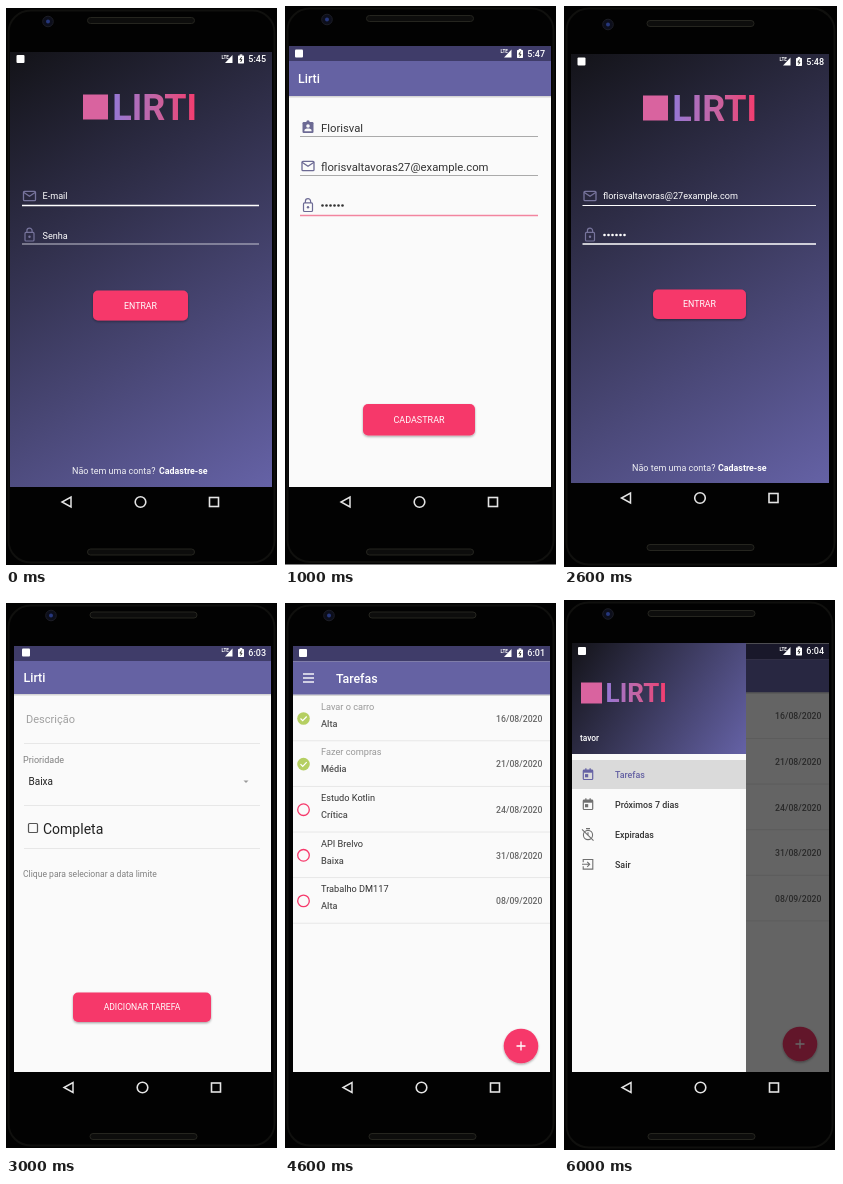
Write an HTML page that moves like this. It is 273x561 px and loops after 7 s.

```html
<!DOCTYPE html>
<html lang="pt">
<head>
<meta charset="utf-8">
<style>
html, body { margin: 0; width: 100%; height: 100%; overflow: hidden; background: #fff; }
svg { display: block; width: 273px; height: 561px; font-family: Roboto, "Noto Sans", sans-serif; }
</style>
</head>
<body>
<svg id="stage" viewBox="0 0 273 561">
  <defs>
    <linearGradient id="night" gradientUnits="userSpaceOnUse" x1="6" y1="46" x2="266" y2="480">
      <stop offset="0" stop-color="#131318"/><stop offset="1" stop-color="#6562a6"/>
    </linearGradient>
    <linearGradient id="header" gradientUnits="userSpaceOnUse" x1="8" y1="48" x2="182" y2="159">
      <stop offset="0" stop-color="#131318"/><stop offset="1" stop-color="#6562a6"/>
    </linearGradient>
    <linearGradient id="brand">
      <stop offset="0" stop-color="#9478d6"/><stop offset=".55" stop-color="#c9629f"/><stop offset="1" stop-color="#f53b6d"/>
    </linearGradient>
    <filter id="shadow" x="-20%" y="-40%" width="140%" height="190%">
      <feDropShadow dx="0" dy="1.2" stdDeviation="1.2" flood-opacity=".35"/>
    </filter>
  </defs>
</svg>
<script>
const PINK = '#f6396b', PURPLE = '#6562a3', PAPER = '#fafafa', DIVIDER = '#e7e7e7';
const APP = 'Lirti';

const rect = (x, y, w, h, fill, rx = 0, more = '') =>
  `<rect x="${x}" y="${y}" width="${w}" height="${h}" fill="${fill}" rx="${rx}" ${more}/>`;
const circle = (x, y, r, fill, more = '') => `<circle cx="${x}" cy="${y}" r="${r}" fill="${fill}" ${more}/>`;
const path = (d, stroke, w = 1, fill = 'none') =>
  `<path d="${d}" fill="${fill}" stroke="${stroke}" stroke-width="${w}"/>`;
const text = (x, y, s, size, fill, weight = 400, anchor = 'start') =>
  `<text x="${x}" y="${y}" font-size="${size}" fill="${fill}" font-weight="${weight}" text-anchor="${anchor}">${s}</text>`;
const rule = (x1, x2, y, color, w = 1) => path(`M${x1} ${y}H${x2}`, color, w);
const at = (x, y, body) => `<g transform="translate(${x} ${y})">${body}</g>`;

// Icons, centred on 0,0
const icons = {
  mail: c => rect(-6, -4.7, 12, 9.4, 'none', 1, `stroke="${c}" stroke-width="1.3"`) + path('M-6 -3.8L0 .3L6 -3.8', c, 1.3),
  lock: c => rect(-4.5, -2.6, 9, 8.6, 'none', 1, `stroke="${c}" stroke-width="1.2"`) +
    path('M-2.6 -2.6V-4.2A2.6 2.6 0 0 1 2.6 -4.2V-2.6', c, 1.2) + circle(0, 1.7, 1.2, c),
  badge: c => rect(-5.5, -5, 11, 11, c, 1.2) + circle(0, -5, 1.7, c) + circle(0, -1, 1.8, PAPER) +
    path('M-3.6 4.2V3.4C-3.6 1 3.6 1 3.6 3.4V4.2Z', 'none', 0, PAPER),
  calendar: c => rect(-4.7, -4.2, 9.4, 9.4, 'none', .8, `stroke="${c}" stroke-width="1.2"`) +
    rect(-4.7, -4.2, 9.4, 2.6, c) + rect(-2.8, -6, 1.3, 2, c) + rect(1.5, -6, 1.3, 2, c) + rect(-3, -.2, 3.2, 3.2, c),
  timerOff: c => circle(0, .7, 4.6, 'none', `stroke="${c}" stroke-width="1.1"`) +
    path('M-2 -5.7H2M0 -2V1M-6 -5L5.5 6.3', c, 1.1),
  exit: c => path('M-4.8 -2V-4.8H4.8V4.8H-4.8V2M-6 0H1.6M-.8 -2.5L1.7 0L-.8 2.5', c, 1.1),
};
const icon = (name, x, y, color) => at(x, y, icons[name](color));

const button = (x, y, w, h, label, size = 8.8) =>
  rect(x, y, w, h, PINK, 5, 'filter="url(#shadow)"') + text(x + w / 2, y + h / 2 + 3.2, label, size, '#fff', 400, 'middle');

const dots = (x, y, color) => [0, 1, 2, 3, 4, 5].map(i => circle(x + 1.5 + i * 4, y, 1.3, color)).join('');

const logo = (x, y, side, size) =>
  rect(x, y - side / 2, side, side, '#d9639f') +
  text(x + side * 1.17, y + size * .355, APP.toUpperCase(), size, 'url(#brand)', 700);

const status = (x, y, time) =>
  rect(x - 4, y - 4, 8, 8, '#fff', 1) +
  text(215.5, y - .5, 'LTE', 4.6, '#fff', 700) +
  path(`M219 ${y + 4}L226.5 ${y - 4}V${y + 4}Z`, 'none', 0, '#fff') +
  rect(232, y - 3.6, 6, 8, '#fff', .6) + rect(233.7, y - 4.6, 2.6, 1.4, '#fff') +
  path(`M235.6 ${y - 2}L233.9 ${y + .7}H236L234.6 ${y + 3}`, '#222', .9) +
  text(260, y + 3.2, time, 9, '#fff', 500, 'end');

function phone(p, content) {
  const [top, bottom] = p.body, [x, y, x2, y2] = p.screen, w = p.wide || 271, c = p.nav;
  const slot = sy => rect(p.slot, sy, 107, 6, '#0d0d0c', 3, 'stroke="#25251f"');
  return rect(0, top, w, bottom - top, '#020202') +
    rect(2.5, top + 2.5, w - 5, bottom - top - 5, 'none', 22, 'stroke="#10100e" stroke-width="2"') +
    slot(p.ear) + slot(p.chin) +
    circle(p.cam[0], p.cam[1], 5.3, '#0c0e1b', 'stroke="#1c1d25"') + circle(p.cam[0], p.cam[1], 2, '#26377c') +
    rect(x, y, x2 - x, y2 - y, p.fill || PAPER) + content +
    status(p.mark, p.bar, p.time) +
    path(`M${c[0] + 4} ${c[1] - 5}V${c[1] + 5}L${c[0] - 5} ${c[1]}Z`, '#e4e4e4', 1.5) +
    circle(c[0] + 73.5, c[1], 5.3, 'none', 'stroke="#e4e4e4" stroke-width="1.6"') +
    rect(c[0] + 142.5, c[1] - 4.5, 9, 9, 'none', 0, 'stroke="#e4e4e4" stroke-width="1.6"');
}

const toolbar = (x, y, x2, barH, h, title, tx) =>
  rect(x, y, x2 - x, barH, '#3f3c69') + rect(x, y + barH, x2 - x, h, PURPLE) +
  rect(x, y + barH + h, x2 - x, 1.5, '#000', 0, 'opacity=".15"') +
  text(tx, y + barH + h / 2 + 4.5, title, 12.4, '#fff', 500);

function login(o) {
  const c = '#77749c';
  return logo(o.logo, o.logoY, 25, 36) +
    icon('mail', o.x + 7.5, o.y, c) + icon('lock', o.x + 7.5, o.y + 39, c) +
    text(o.x + 20.5, o.y + 3.2, o.mail, 9.1, '#fff') + o.pass +
    rule(o.x, o.x2, o.y + 9.5, '#fff', o.focus ? 1 : 1.6) +
    rule(o.x, o.x2, o.y + 48, o.focus ? '#fff' : '#c4c4d0', o.focus ? 1.6 : 1) +
    button(...o.button, 'ENTRAR') +
    text(o.foot, o.footY, 'Não tem uma conta?', 9, '#f0f0f4') +
    text(o.bold, o.footY, 'Cadastre-se', 8.9, '#fff', 700);
}

const signup = () => toolbar(4, 40, 266, 15, 35, APP, 13) +
  icon('badge', 23, 121, '#6c6a94') + text(36, 125.5, 'Florisval', 11.3, '#333') + rule(15, 253, 130.5, '#aaa') +
  icon('mail', 23, 160, '#6c6a94') + text(36, 164.5, 'florisvaltavoras27@example.com', 11.3, '#333') + rule(15, 253, 169.5, '#aaa') +
  icon('lock', 23, 199.5, '#6c6a94') + dots(36, 199.5, '#333') + rule(15, 253, 209.5, '#f2859f', 1.5) +
  button(78, 398, 112, 31.5, 'CADASTRAR', 9);

const form = () => toolbar(8, 51, 265, 15, 33, APP, 17.5) +
  text(20, 128, 'Descrição', 11, '#a0a0a0') + rule(18, 254, 148.5, DIVIDER) +
  text(17, 168, 'Prioridade', 9, '#808080') + text(22.5, 190, 'Baixa', 10, '#222') +
  path('M237.5 185.5H242.5L240 188Z', 'none', 0, '#999') + rule(18, 254, 210.5, DIVIDER) +
  rect(22.5, 228.5, 9, 9, 'none', 1, 'stroke="#555" stroke-width="1.2"') + text(37, 238.5, 'Completa', 14, '#222') +
  rule(18, 254, 253.5, DIVIDER) + text(17, 282, 'Clique para selecionar a data limite', 8.6, '#808080') +
  button(67, 397.5, 138, 29.5, 'ADICIONAR TAREFA', 8.6);

const todos = [
  ['Lavar o carro', 'Alta', '16/08/2020', true],
  ['Fazer compras', 'Média', '21/08/2020', true],
  ['Estudo Kotlin', 'Crítica', '24/08/2020'],
  ['API Brelvo', 'Baixa', '31/08/2020'],
  ['Trabalho DM117', 'Alta', '08/09/2020'],
];

function list(y, fabX, fabY) {
  const rows = todos.map(([name, level, date, done], i) => {
    const m = y + 72.5 + i * 45.6;
    const tick = done
      ? circle(18.5, m, 6.3, '#b5cf62') + path(`M15.5 ${m}L17.7 ${m + 2.2}L21.7 ${m - 2}`, '#fff', 1.2)
      : circle(18.5, m, 5.8, 'none', `stroke="${PINK}" stroke-width="1.3"`);
    return tick + text(36, m - 8.7, name, 9.2, done ? '#999' : '#333') +
      text(36, m + 8.2, level, 9.2, '#555', 500) + text(257.5, m + 3.2, date, 8.7, '#666', 500, 'end') +
      rule(8, 265, m + 22.3, DIVIDER);
  }).join('');
  const burger = [-4, 0, 4].map(d => rule(18, 29, y + 32 + d, '#fff', 1.4)).join('');
  return rows + toolbar(8, y, 265, 15.5, 33, 'Tarefas', 51) + burger +
    circle(fabX, fabY, 17.3, PINK, 'filter="url(#shadow)"') +
    path(`M${fabX - 4.5} ${fabY}h9M${fabX} ${fabY - 4.5}v9`, '#fff', 1.3);
}

const dim = y => rect(8, y, 257, 477 - y, '#000', 0, 'opacity=".6"');

const dialog = () => dim(49) + rect(23, 213, 225, 100, '#fff', 1, 'filter="url(#shadow)"') +
  text(38, 238.5, 'Remoção de tarefa', 12.6, '#222', 500) +
  text(38, 258, 'Remover tarefa?', 10, '#666') +
  text(38, 298.5, 'CANCELAR', 8.9, PINK) + text(212, 298.5, 'SIM', 8.9, PINK);

function drawer() {
  const items = [['calendar', 'Tarefas'], ['calendar', 'Próximos 7 dias'], ['timerOff', 'Expiradas'], ['exit', 'Sair']];
  return dim(48) + rect(8, 48, 174, 429, PAPER) + rect(8, 48, 174, 111, 'url(#header)') +
    logo(17, 98, 21, 26) + text(16, 146, 'tavor', 8.4, '#fff', 500) +
    rect(8, 165, 174, 29, '#dadada') +
    items.map(([name, label], i) => {
      const y = 179.3 + i * 30;
      return icon(name, 24, y, i ? '#707070' : PURPLE) + text(51, y + 3.2, label, 8.9, i ? '#333' : PURPLE, 500);
    }).join('');
}

const base = { screen: [8, 51, 265, 477], slot: 84, chin: 538.5, nav: [63, 492.5], mark: 18 };

const scenes = [
  phone({ body: [2, 559], screen: [4, 46, 266, 481], fill: 'url(#night)', slot: 81.5, ear: 11.5, chin: 543, cam: [42, 15.5],
    nav: [61, 496], mark: 14.5, bar: 53, time: '5:45' },
    login({ logo: 77, logoY: 101, x: 16, x2: 253, y: 190, mail: 'E-mail', pass: text(36.5, 232.5, 'Senha', 9.1, '#fff'),
      button: [87, 284.5, 95, 30], foot: 66, bold: 153, footY: 468 })),
  phone({ body: [0, 558.5], screen: [4, 40, 266, 481], slot: 81.5, ear: 9.5, chin: 543, cam: [42, 13.5],
    nav: [61, 496], mark: 14, bar: 47.5, time: '5:47' }, signup()),
  phone({ body: [0, 561], wide: 273, screen: [7, 48, 265, 477], fill: 'url(#night)', slot: 83, ear: 14.5, chin: 538.5, cam: [44, 18.5],
    nav: [62.5, 492], mark: 17.5, bar: 55.5, time: '5:48' },
    login({ logo: 79, logoY: 102, x: 18.5, x2: 252, y: 190, focus: true, mail: 'florisvaltavoras@27example.com',
      pass: dots(39, 229, '#fff'), button: [89, 283.5, 93, 29.5], foot: 68, bold: 154, footY: 464.5 })),
  phone({ ...base, body: [8, 553], ear: 17, cam: [45, 20.5], mark: 20, bar: 57.5, time: '6:03' }, form()),
  phone({ ...base, body: [8, 553], ear: 17, cam: [44, 20.5], bar: 58, time: '6:01' }, list(51, 236, 451)),
  phone({ ...base, body: [6, 555], screen: [8, 49, 265, 477], ear: 16, cam: [44, 19.5], bar: 56.5, time: '6:05' },
    list(49.5, 237, 450.5) + dialog()),
  phone({ ...base, body: [5, 555], screen: [8, 48, 265, 477], ear: 15.5, cam: [44, 19], bar: 56, time: '6:04' },
    list(48.7, 236, 449) + drawer()),
];

const stage = document.getElementById('stage');
stage.insertAdjacentHTML('beforeend', scenes.map(s => `<g display="none">${s}</g>`).join(''));
const views = [...stage.querySelectorAll(':scope > g')];
const start = performance.now();

function draw() {
  const now = Math.floor((performance.now() - start) / 1000) % views.length;
  views.forEach((v, i) => v.setAttribute('display', i === now ? 'inline' : 'none'));
  requestAnimationFrame(draw);
}
draw();
</script>
</body>
</html>
```
